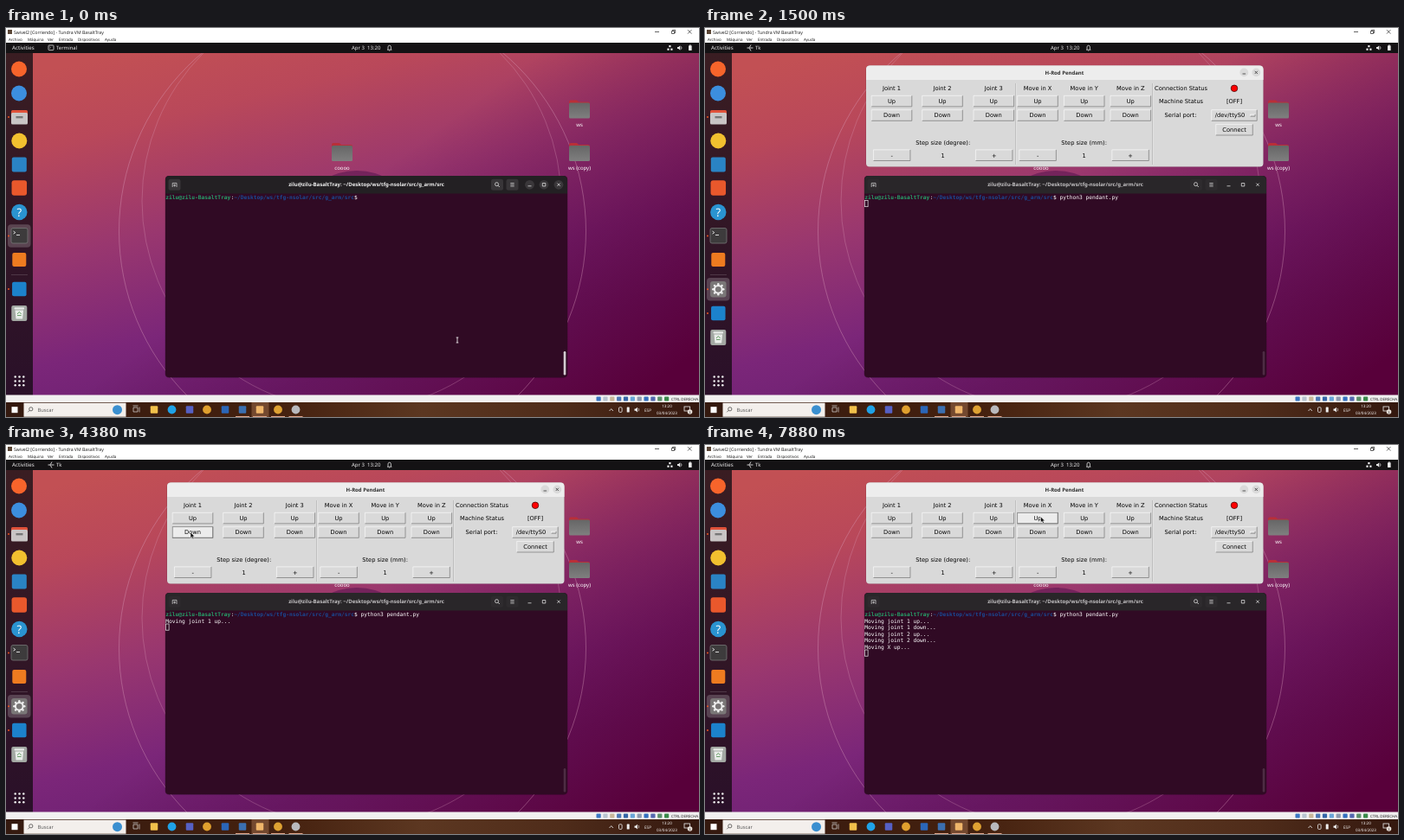
Recreate the animation shown at these times as an HTML page. Size 800x450 px, loop 8 s.

```html
<!DOCTYPE html>
<html lang="es">
<head>
<meta charset="utf-8">
<title>Pendant demo</title>
<style>
html, body { margin: 0; width: 100%; height: 100%; overflow: hidden; background: #000 }
svg { display: block; width: 800px; height: 450px }
text { text-rendering: geometricPrecision }
.win { font-family: "Open Sans", sans-serif }
.gnome { font-family: "Noto Sans", sans-serif }
.tk { font-family: "DejaVu Sans", sans-serif }
.mono { font-family: "DejaVu Sans Mono", monospace }
</style>
</head>
<body>
<svg id="stage" viewBox="0 0 800 450"></svg>
<script>
const LOOP = 8000;
const rect = (x, y, w, h, fill, more = '') =>
  `<rect x="${x}" y="${y}" width="${w}" height="${h}" fill="${fill}" ${more}/>`;
const dot = (x, y, r, fill, more = '') => `<circle cx="${x}" cy="${y}" r="${r}" fill="${fill}" ${more}/>`;
const line = (d, stroke, width = .7, more = '') =>
  `<path d="${d}" fill="none" stroke="${stroke}" stroke-width="${width}" ${more}/>`;
const text = (x, y, s, size, fill, font, more = '') =>
  `<text x="${x}" y="${y}" font-size="${size}" fill="${fill}" class="${font}" ${more}>${s}</text>`;
const mid = 'text-anchor="middle"';
const group = (id, body, more = '') => `<g id="${id}" ${more}>${body}</g>`;
const tile = (x, y, size, fill, r = 2) => rect(x - size / 2, y - size / 2, size, size, fill, `rx="${r}"`);

const USER = 'zilu@zilu-BasaltTray';
const PATH = '~/Desktop/ws/tfg-nsolar/src/g_arm/src';

// ---- wallpaper ----
const wallpaper = `<defs>
  <linearGradient id="sky" gradientUnits="userSpaceOnUse" x1="170" y1="20" x2="270" y2="430">
    <stop offset="0" stop-color="#c25054"/><stop offset=".2" stop-color="#b9485a"/>
    <stop offset=".5" stop-color="#99376f"/><stop offset=".78" stop-color="#7b2679"/>
    <stop offset="1" stop-color="#6c2072"/></linearGradient>
  <linearGradient id="dusk" gradientUnits="userSpaceOnUse" x1="480" y1="130" x2="710" y2="440">
    <stop offset="0" stop-color="#5a003c" stop-opacity="0"/>
    <stop offset=".45" stop-color="#5c0640" stop-opacity=".45"/>
    <stop offset="1" stop-color="#58003a"/></linearGradient>
  <linearGradient id="dockFill" x2="0" y2="1">
    <stop offset="0" stop-color="#3a1d22"/><stop offset="1" stop-color="#2a1029"/></linearGradient>
  <linearGradient id="barFill">
    <stop offset="0" stop-color="#34190f"/><stop offset=".4" stop-color="#45210f"/>
    <stop offset=".6" stop-color="#5c3721"/><stop offset=".8" stop-color="#4f2c1a"/>
    <stop offset="1" stop-color="#34180f"/></linearGradient>
  <linearGradient id="folderFill" x2="0" y2="1">
    <stop offset="0" stop-color="#666"/><stop offset="1" stop-color="#7f7f7f"/></linearGradient>
</defs>` + rect(0, 17, 800, 408, 'url(#sky)') + rect(0, 17, 800, 408, 'url(#dusk)')
  + '<ellipse cx="405" cy="205" rx="55" ry="40" fill="#5b1650" opacity=".6"/>'
  + dot(400, 235, 269.5, 'none', 'stroke="#dca0bd" stroke-width=".6" opacity=".65"')
  + dot(399, 200, 242, 'none', 'stroke="#dca0bd" stroke-width=".6" opacity=".5"');

const folder = (x, y, name) =>
  `<path d="M${x - 12} ${y - 9}q0-2 2-2h7l2 2h11q2 0 2 2v8h-24z" fill="#b92f38"/>`
  + rect(x - 12, y - 8, 24, 18, 'url(#folderFill)', 'rx="1.5"')
  + text(x, y + 19.5, name, 6, '#fff', 'gnome', mid);
const desktop = folder(662, 94.5, 'ws') + folder(662, 144, 'ws (copy)') + folder(388, 144, 'coooo');

// ---- host window chrome ----
const menu = [[3, 'Archivo'], [25, 'Máquina'], [48, 'Ver'], [61, 'Entrada'], [83, 'Dispositivos'], [114, 'Ayuda']];
const chrome = rect(0, 0, 800, 17, '#fff') + tile(4.5, 4.5, 5, '#5a4636', 0)
  + text(9, 6.6, 'Swivel2 [Corriendo] - Tundra VM BasaltTray', 5.2, '#111', 'win')
  + line('M749 4.5h5', '#222') + line('M768.5 3.5h3v3h-3zM769.5 3.5v-1.2h3.2v3.2h-1.2M787 2.2l4.4 4.4m0-4.4l-4.4 4.4', '#222')
  + menu.map(([x, s]) => text(x, 15.2, s, 4.5, '#111', 'win')).join('');

// ---- guest top bar ----
const topBar = rect(0, 17, 800, 12, '#141214')
  + text(7, 25.2, 'Activities', 6.2, '#eee', 'gnome', 'font-weight="500"')
  + group('termName', rect(49, 20, 6, 5.6, 'none', 'stroke="#ddd" stroke-width=".8" rx=".8"')
    + line('M50.3 21.7l1.2 1-1.2 1', '#ddd', .6) + text(58, 25.2, 'Terminal', 5.9, '#eee', 'gnome', 'font-weight="500"'))
  + group('tkName', line('M48.5 23h2.5l2-3.5m-2 3.5l2 3.5M52 23h3.5', '#ddd', .9)
    + text(58, 25.2, 'Tk', 5.9, '#eee', 'gnome', 'font-weight="500"'))
  + text(399, 25.2, 'Apr 3&#160; 13:20', 6, '#eee', 'gnome', 'font-weight="500"')
  + line('M440 25.2h5.4m-4.4 0v-3.2q0-1.8 1.7-1.8t1.7 1.8v3.2m-2.2 1h1', '#ddd', .8)
  + rect(765.3, 20, 2.2, 2.2, '#eee') + rect(763.4, 23.6, 2.2, 2.2, '#eee') + rect(767.3, 23.6, 2.2, 2.2, '#eee')
  + '<path d="M775 22h1.3l2-1.8v5.6l-2-1.8h-1.3z" fill="#eee"/>' + line('M779.4 21.4q1.2 1.6 0 3.2', '#eee')
  + rect(788, 20.3, 3.6, 5.6, '#eee', 'rx=".5"') + rect(789, 19.5, 1.6, 1, '#eee');

// ---- dock ----
const runDot = y => dot(3, y, 1, '#e95420');
const glow = y => rect(2, y - 13.3, 26.5, 26.6, '#fff', 'rx="4" opacity=".2"');
const ring = (n, r) => Array.from({ length: n }, (_, i) => {
  const a = i * 2 * Math.PI / n;
  return dot(15.3 + r * Math.cos(a), 302.3 + r * Math.sin(a), 1.2, '#f0f0f0');
}).join('');
const grid = Array.from({ length: 9 }, (_, i) => dot(10.7 + i % 3 * 4.8, 403.6 + (i / 3 | 0) * 4.8, 1.25, '#eee')).join('');
const dock = rect(0, 29, 31, 396, 'url(#dockFill)')
  + dot(15, 47.5, 9, '#f7642b') + dot(15, 75.5, 9, '#3c8ede')
  + rect(6, 95, 19, 6, '#e0523a', 'rx="1.5"') + rect(6, 98, 19, 13.5, '#c9c5c5', 'rx="1.5"') + rect(11.5, 102, 8, 2.4, '#777') + runDot(103)
  + dot(15.3, 130.5, 9, '#f2c02f') + tile(15.3, 158, 17, '#2a83c4') + tile(15.3, 185, 17.5, '#e9582c', 3)
  + dot(15.3, 213, 9.2, '#2a93d0') + text(15.3, 217.7, '?', 13, '#fff', 'gnome', mid)
  + group('termGlow', glow(240.5))
  + rect(6, 231.5, 19, 17.5, '#3d3b3c', 'rx="2" stroke="#777" stroke-width=".8"')
  + line('M8.5 235l2.3 1.6-2.3 1.6M12 239.5h4', '#fff', .8) + runDot(240.5)
  + tile(15.3, 268, 16, '#ee7b20') + rect(6, 285, 19, .6, '#fff', 'opacity=".25"')
  + group('gear', glow(302.3) + tile(15.3, 302.3, 18.5, '#7a7777', 3)
    + ring(8, 6) + dot(15.3, 302.3, 4.4, 'none', 'stroke="#f0f0f0" stroke-width="2"') + runDot(302.3))
  + group('dockEnd', tile(15.3, 302, 16.5, '#1c82cc') + runDot(302)
    + tile(15.3, 330, 18, '#a3a8a3') + rect(9.5, 323.2, 11.6, 2.4, '#e9ece9', 'rx="1"')
    + '<path d="M10.5 326.5h9.6l-1 10h-7.6z" fill="#e9ece9"/>' + line('M13 331l2.3-2.6 2.3 2.6m-4.6 1.5h4.6', '#6aa06a', 1))
  + grid;

// ---- terminal window ----
const knob = x => dot(x, 181.3, 5.4, '#3a373a');
const plate = x => rect(x - 7, 174.8, 14, 13, '#383538', 'rx="2.5"');
const terminal = rect(183.5, 171, 465, 234, '#000', 'rx="5" opacity=".25"')
  + rect(184, 171, 464, 233, '#300a24', 'rx="4"')
  + '<path id="titleBar" d="M184 191.5v-15q0-5.5 5.5-5.5h453q5.5 0 5.5 5.5v15z"/>'
  + group('plates', plate(194.5) + plate(567) + plate(584.5))
  + group('knobs', knob(604.5) + knob(621) + knob(638))
  + line('M192.2 184v-4.6h4.8v4.6m-2.4-.4v-3m-1.4 1.4h2.8', '#ddd', .7)
  + dot(566.5, 180.7, 2, 'none', 'stroke="#ddd" stroke-width=".8"') + line('M568 182.2l1.8 1.8', '#ddd', .9)
  + line('M582.3 179.5h4.4m-4.4 1.8h4.4m-4.4 1.8h4.4', '#ddd', .7)
  + line('M602.5 182.8h4', '#ddd', .8) + line('M619.3 179.5h3.5v3.5h-3.5z', '#ddd', .8)
  + line('M636.4 179.6l3.3 3.3m0-3.3l-3.3 3.3', '#ddd', .8)
  + text(416, 183.4, `${USER}: ${PATH}`, 6, '#f2f2f2', 'gnome', mid + ' font-weight="700" id="termTitle"')
  + `<text x="184.3" y="198" font-size="6.24" class="mono" fill="#fff"><tspan fill="#26a269" font-weight="700">${USER}</tspan>:`
  + `<tspan fill="#1a4a94" font-weight="700">${PATH}</tspan>$<tspan id="cmd"> python3 pendant.py</tspan></text>`
  + group('output', '') + rect(184.6, 199.5, 3.5, 7.2, 'none', 'id="caret" stroke="#eee" stroke-width=".7"')
  + rect(643.7, 374, 2.6, 27.5, '#d4cdd2', 'rx="1.3" id="scroll"');

// ---- control panel ----
const columns = [[215.5, 'Joint 1'], [274, 'Joint 2'], [333.3, 'Joint 3'], [384, 'Move in X'], [437.7, 'Move in Y'], [491.3, 'Move in Z']];
const label = (x, y, s, more = mid) => text(x, y + 2.4, s, 6.67, '#000', 'tk', more);
const bevel = (x, y, w, h) => line(`M${x} ${y + h}V${y}H${x + w}`, '#fff', .6)
  + line(`M${x} ${y + h}H${x + w}V${y}`, '#808080', .8);
const button = (x, y, w, s) => rect(x - w / 2, y - 6.3, w, 12.6, '#d9d9d9') + bevel(x - w / 2, y - 6.3, w, 12.6) + label(x, y, s);
const pads = ['Up', 'Down'].flatMap((s, row) => columns.map(([x]) => ({ x, y: 84.6 + row * 16.4, s })));
const pad = p => `<g class="pad">${button(p.x, p.y, 46.6, p.s)}`
  + rect(p.x - 23.3, p.y - 6.3, 46.6, 12.6, 'none', 'stroke="#777" stroke-width=".8"') + '</g>';
const stepper = (x, unit, gap) => label(x, 132.5, `Step size (${unit}):`) + label(x, 147.2, '1')
  + button(x - gap, 147.2, 42.5, '-') + button(x + gap, 147.2, 42.5, '+');
const panel = group('panel', rect(185.5, 43, 459.5, 118, '#000', 'rx="5" opacity=".15"')
  + rect(186, 43.5, 458.5, 117, '#d9d9d9', 'rx="4"')
  + '<path d="M186 60v-11.5q0-5 5-5h448.500q5 0 5 5v11.5z" fill="#ededed"/>'
  + text(415, 53.7, 'H-Rod Pendant', 6, '#2d2d2d', 'gnome', mid + ' font-weight="700"')
  + dot(622.3, 51.4, 4.9, '#dadada') + dot(636.3, 51.4, 4.9, '#dadada')
  + line('M620.5 53h3.6M634.7 49.8l3.2 3.2m0-3.2l-3.2 3.2', '#333', .8)
  + [358.7, 516.6].map(x => line(`M${x} 64V158`, '#a8a8a8', .7) + line(`M${x + .7} 64V158`, '#f4f4f4', .5)).join('')
  + columns.map(([x, s]) => label(x, 69.7, s)).join('') + pads.map(pad).join('')
  + stepper(274.7, 'degree', 59) + stepper(437.6, 'mm', 53.5)
  + label(549.5, 69.7, 'Connection Status') + label(549.5, 84.5, 'Machine Status') + label(549, 101, 'Serial port:')
  + dot(611, 69.8, 3.8, '#f00', 'stroke="#300" stroke-width=".7"') + label(611, 84.5, '[OFF]')
  + bevel(584.7, 94.7, 52.5, 12.6) + label(588.8, 101, '/dev/ttyS0', '') + bevel(629.5, 100, 5.5, 2.2)
  + button(611, 117.7, 42.5, 'Connect'));

// ---- host status bar and taskbar ----
const statusTones = ['#3b78c4', '#b8c4d0', '#c9b89a', '#4d79b5', '#3566a8', '#69a5d8', '#8c9bb0', '#3470c0', '#5468b0', '#5b8f6a', '#3a8a4a'];
const apps = [[171, '#f2c14b'], [191.5, '#1fa2e6'], [212, '#5660c4'], [232, '#e0a02e'], [253, '#2b66b8'], [273, '#3b6fb0'], [293, '#f0b66a'], [314, '#dfa232'], [334.5, '#b9b9bd']];
const round = [191.5, 232, 314, 334.5];
const taskbar = rect(0, 424.5, 800, 9, '#f1f0f0')
  + statusTones.map((c, i) => rect(681.5 + i * 7.85, 426.6, 5.2, 5, c, 'rx=".8"')).join('')
  + text(768, 431, 'CTRL DERECHA', 4.4, '#111', 'win')
  + rect(0, 433, 800, 17, 'url(#barFill)') + tile(10, 441.7, 7, '#fff', 0)
  + rect(20.5, 433.7, 118, 16, '#f3efec')
  + dot(28.8, 440.8, 2.1, 'none', 'stroke="#333" stroke-width=".7"') + line('M27.3 442.3l-2 2', '#333')
  + text(36.5, 443.9, 'Buscar', 5.8, '#555', 'win') + dot(128.5, 441.7, 5.5, '#3a8fd0')
  + line('M147 439h5v5h-5zM154 438.5v6M146.5 437h6', '#ddd')
  + rect(283.5, 433, 20, 17, '#74492f')
  + apps.map(([x, c]) => (round.includes(x) ? dot(x, 441.5, 4.9, c) : tile(x, 441.5, 8.5, c, 1))
    + (x > 260 ? rect(x - 8, 449, 16, 1, '#e0a58a') : '')).join('')
  + line('M696.5 443l2.2-2.4 2.2 2.4', '#eee', .8) + rect(707.5, 438.8, 3.6, 5.6, 'none', 'rx="1" stroke="#eee" stroke-width=".8"')
  + rect(716.7, 438.5, 3, 6, '#eee', 'rx=".6"') + '<path d="M725.5 440.5h1.4l2-1.8v5.8l-2-1.8h-1.4z" fill="#eee"/>'
  + line('M730 439.8q1.3 1.7 0 3.6', '#eee')
  + text(741, 443.5, 'ESP', 4.7, '#fff', 'win', mid) + text(763, 439.4, '13:20', 4.5, '#fff', 'win', mid)
  + text(763, 447.2, '03/04/2023', 4.5, '#fff', 'win', mid)
  + rect(783, 438, 6.5, 5, 'none', 'stroke="#eee" stroke-width=".8"') + dot(789.5, 444, 2.8, '#e8e0da')
  + text(789.5, 445.6, '3', 4, '#222', 'win', mid);

const pointer = group('arrow', '<path d="M0 0v6.7l1.6-1.4 1.2 2.5 1.2-.6-1.2-2.4h2.1z" fill="#111" stroke="#fff" stroke-width=".5"/>')
  + group('beam', line('M-1.3-3h2.6M0-3v6M-1.3 3h2.6', '#fff', .8));

const $ = id => document.getElementById(id);
$('stage').innerHTML = wallpaper + desktop + dock + terminal + panel + topBar + chrome + taskbar + pointer;
const padNodes = [...document.querySelectorAll('.pad')];

// ---- motion ----
const RECALL = 375, ENTER = 625, FOCUS = 820, OPEN = 1080, WAKE = 1900, RELEASE = 140;
const clicks = [[2980, 0, 'joint 1 up'], [4350, 6, 'joint 1 down'], [5500, 1, 'joint 2 up'], [6850, 7, 'joint 2 down'], [7560, 3, 'X up']];
const path = [[WAKE, 521, 361], [2600, 203.5, 89.5], [2780, 203.5, 89.5], [2950, 214, 85], [3500, 214, 85],
  [4150, 213, 101], [4700, 213, 101], [5300, 273, 84], [5800, 273, 84], [6450, 278, 104], [7020, 278, 104], [7480, 387.5, 83]];

const ease = k => k * k * (3 - 2 * k);
const clamp = k => Math.max(0, Math.min(1, k));
function pointerAt(t) {
  const i = path.findIndex(p => p[0] > t);
  if (i === 0) return path[0].slice(1);
  if (i < 0) return path[path.length - 1].slice(1);
  const [t0, x0, y0] = path[i - 1], [t1, x1, y1] = path[i];
  const k = ease((t - t0) / (t1 - t0));
  return [x0 + (x1 - x0) * k, y0 + (y1 - y0) * k];
}
const set = (id, name, value) => $(id).setAttribute(name, value);
const show = (id, on) => set(id, 'visibility', on ? 'visible' : 'hidden');

function draw(t) {
  const open = t >= OPEN;
  show('cmd', t >= RECALL);
  show('caret', t >= ENTER);
  show('termName', t < FOCUS);
  show('tkName', t >= FOCUS);
  show('termGlow', t < FOCUS);
  show('gear', open);
  show('knobs', !open);
  set('plates', 'opacity', open ? .35 : 1);
  set('titleBar', 'fill', open ? '#292629' : '#232023');
  set('termTitle', 'fill', open ? '#c4c2c4' : '#f2f2f2');
  set('scroll', 'opacity', open ? .18 : 1);
  set('dockEnd', 'transform', `translate(0 ${open ? 28 : 0})`);

  const k = ease(clamp((t - OPEN) / 170)), s = .8 + .2 * k;
  set('panel', 'opacity', k);
  set('panel', 'transform', `translate(415 102) scale(${s}) translate(-415 -102)`);

  const printed = clicks.filter(c => t >= c[0] + RELEASE);
  $('output').innerHTML = printed.map((c, i) =>
    text(184.3, 205.6 + i * 7.5, `Moving ${c[2]}...`, 6.24, '#fff', 'mono')).join('');
  set('caret', 'y', 199.5 + printed.length * 7.5);

  const [x, y] = pointerAt(t);
  const awake = t < RECALL || t >= WAKE;
  const inText = x > 184 && x < 648 && y > 191 && y < 404;
  show('arrow', awake && !inText);
  show('beam', awake && inText);
  for (const id of ['arrow', 'beam']) set(id, 'transform', `translate(${x} ${y})`);

  const pressed = clicks.filter(c => t >= c[0]).map(c => c[1]).pop();
  pads.forEach((p, i) => {
    const over = t >= WAKE && Math.abs(x - p.x) < 23.3 && Math.abs(y - p.y) < 6.3;
    padNodes[i].firstChild.setAttribute('fill', over ? '#ececec' : '#d9d9d9');
    padNodes[i].lastChild.setAttribute('visibility', i === pressed ? 'inherit' : 'hidden');
  });
}

const start = performance.now();
function tick() {
  draw((performance.now() - start) % LOOP);
  requestAnimationFrame(tick);
}
tick();
</script>
</body>
</html>
```
